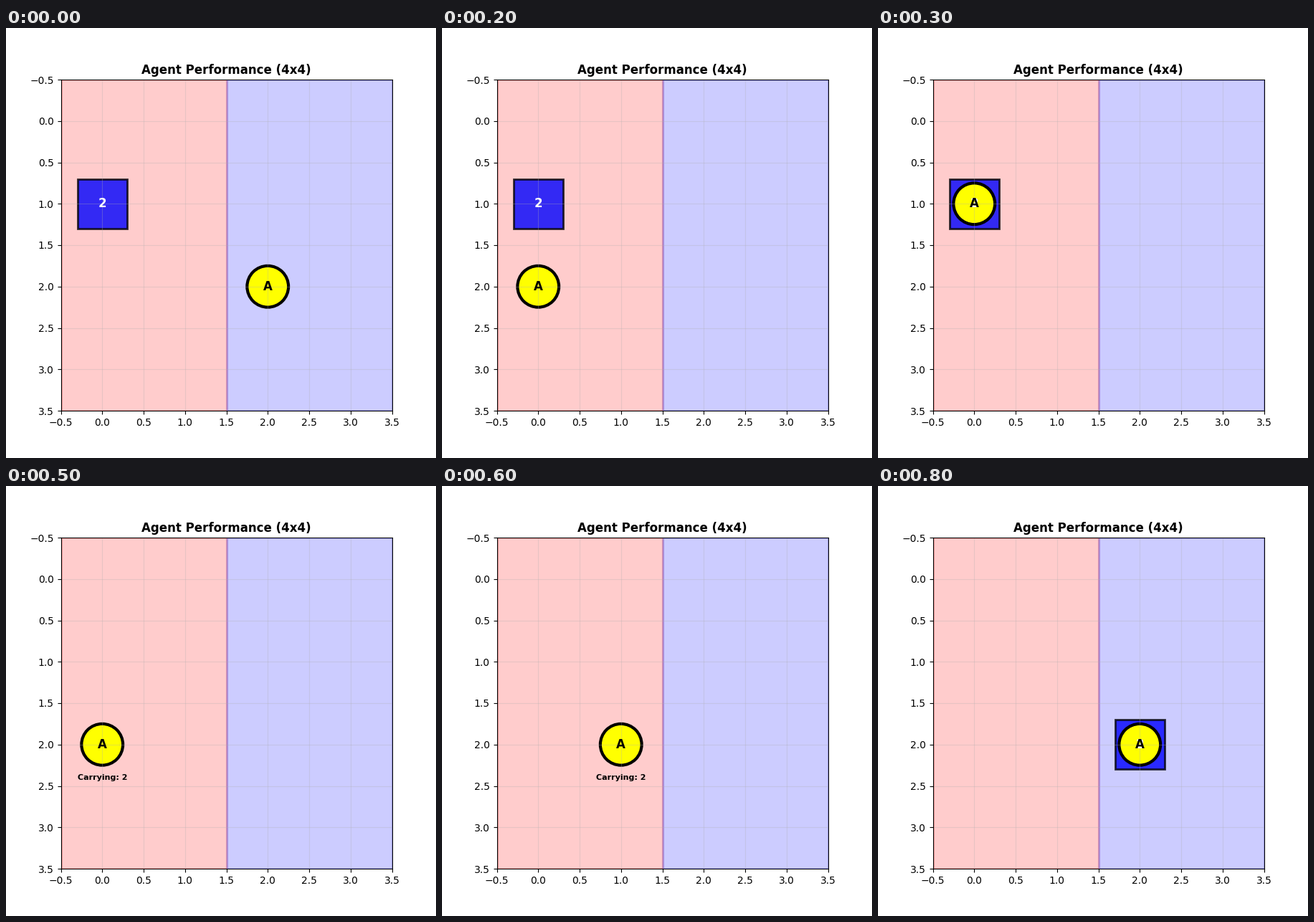
Write a matplotlib script that moves like this. It is 600 px wide and 600 px high and loops after 900 ms.

```python
import matplotlib.pyplot as plt
from matplotlib.animation import FuncAnimation
from matplotlib.patches import Circle, Rectangle

SIZE = 4
BOX = 0.6
PATH = [(2, 2), (1, 2), (0, 2), (0, 1), (0, 1), (0, 2), (1, 2), (2, 2), (2, 2)]
PICK, DROP = 4, 8  # steps at which the box is lifted and put down

fig, ax = plt.subplots(figsize=(6, 6), dpi=100)
ax.set_xlim(-0.5, SIZE - 0.5)
ax.set_ylim(SIZE - 0.5, -0.5)
ax.set_aspect("equal")
ax.grid(True, alpha=0.3)
ax.set_title(f"Agent Performance ({SIZE}x{SIZE})", fontsize=12, fontweight="bold")


def zone(x, color):
    ax.add_patch(Rectangle((x, -0.5), SIZE / 2, SIZE, facecolor=color,
                           edgecolor=color, linewidth=2, alpha=0.2))


def label(text, color="black", size=12):
    return ax.text(0, 0, text, color=color, fontsize=size, fontweight="bold",
                   ha="center", va="center")


zone(-0.5, "red")
zone(1.5, "blue")

box = ax.add_patch(Rectangle((0, 0), BOX, BOX, facecolor="blue",
                             edgecolor="black", linewidth=2, alpha=0.8))
agent = ax.add_patch(Circle((0, 0), 0.25, facecolor="yellow",
                            edgecolor="black", linewidth=3))
box_label = label("2", "white")
agent_label = label("A")
load_label = label("Carrying: 2", size=8)


def update(step):
    x, y = PATH[step]
    agent.center = (x, y)
    agent_label.set_position((x, y))

    carrying = PICK <= step < DROP
    load_label.set_position((x, y + 0.4))
    load_label.set_visible(carrying)

    bx, by = PATH[PICK] if step < PICK else PATH[DROP]
    box.set_xy((bx - BOX / 2, by - BOX / 2))
    box_label.set_position((bx, by))
    box.set_visible(not carrying)
    box_label.set_visible(not carrying)
    return box, agent, box_label, agent_label, load_label


anim = FuncAnimation(fig, update, frames=len(PATH), interval=100,
                     repeat=True, repeat_delay=0, blit=False)
plt.show()
```
